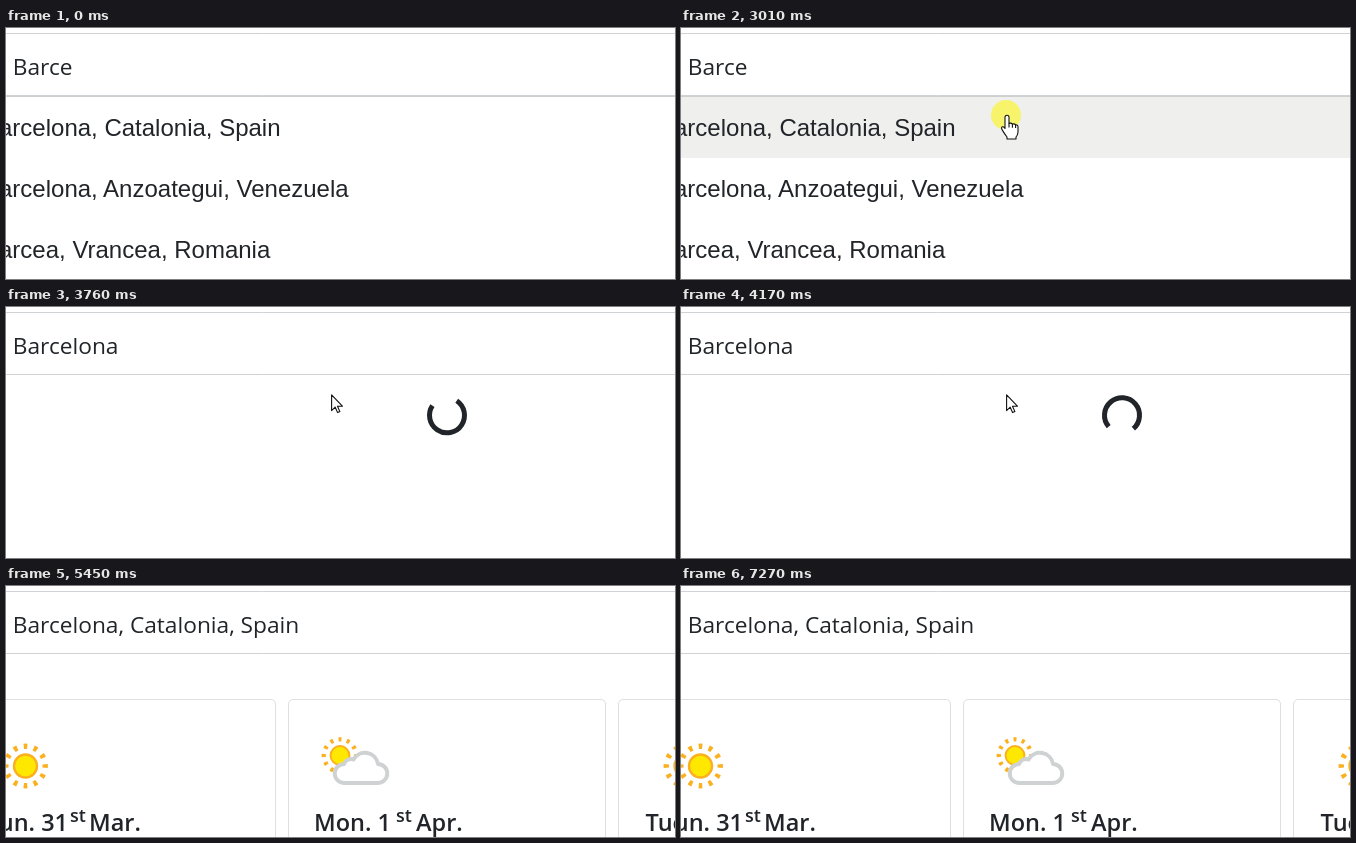
An HTML page that plays this animation: 669x251 px, repeating every 8400 ms.

```html
<!DOCTYPE html>
<html lang="en">
<head>
<meta charset="utf-8">
<title>City search</title>
<style>
  html, body { margin: 0; width: 100%; height: 100%; overflow: hidden; background: #fff; }
  svg { display: block; width: 100%; height: 100%; }
  text { fill: #212529; white-space: pre; }
  .field { font: 22.7px "Open Sans", "Noto Sans", sans-serif; }
  .option { font: 24px "Liberation Sans", Arial, sans-serif; }
  .day { font: 600 23.5px "Open Sans", "Noto Sans", sans-serif; }
  .sup { font-size: 18px; }
  .card { fill: #fff; stroke: #dfdfdf; }
  .cursor { fill: #fff; stroke: #111; stroke-width: 1.1; stroke-linejoin: round; }
</style>
</head>
<body>
<svg viewBox="0 0 669 251">
  <defs>
    <g id="sun">
      <circle r="11.5" fill="#ffe800" stroke="#fbb020" stroke-width="2.4"/>
      <circle r="19.7" fill="none" stroke="#fbb020" stroke-width="5.4" pathLength="120"
        stroke-dasharray="3.6 6.4" stroke-dashoffset="1.8"/>
    </g>
  </defs>
  <rect width="669" height="251" fill="#fff"/>
  <g id="list">
    <rect id="hover" width="669" height="61" fill="#efefee"/>
    <rect y="68" width="669" height="1" fill="#cfcfcf"/>
  </g>
  <path d="M0 5.5H669M0 67.5H669" stroke="#d0d3d6"/>
  <text id="field" class="field" x="6.8" y="47"></text>
  <circle id="spinner" r="17.5" fill="none" stroke="#212529" stroke-width="5"
    pathLength="360" stroke-dasharray="270 90"/>
  <g id="cards">
    <rect class="card" x="-47.5" y="113.5" width="317" height="160" rx="4.5"/>
    <rect class="card" x="282.5" y="113.5" width="317" height="160" rx="4.5"/>
    <rect class="card" x="612.5" y="113.5" width="317" height="160" rx="4.5"/>
    <use href="#sun" x="19.5" y="180"/>
    <use href="#sun" x="680" y="180"/>
    <use href="#sun" transform="translate(334 169.5) scale(.82)"/>
    <path d="M338.5 197a9.5 9.5 0 0 1-.5-19A7.5 7.5 0 0 1 347.5 173.5A13.2 13.2 0 0 1 372 178A9.5 9.5 0 0 1 371.5 197Z"
      fill="#fff" stroke="#cfd2d3" stroke-width="4" stroke-linejoin="round"/>
    <g class="day">
      <text x="62" y="245" text-anchor="end">Sun. 31</text>
      <text class="sup" x="64" y="236">st</text>
      <text x="83" y="245">Mar.</text>
      <text x="308" y="245">Mon. 1</text>
      <text class="sup" x="390" y="236">st</text>
      <text x="410" y="245">Apr.</text>
      <text x="639.5" y="245">Tue. 2</text>
    </g>
  </g>
  <circle id="click" cx="325" cy="87" r="15" fill="#f7f46c"/>
  <g id="hand" class="cursor">
    <path d="M-2 2.2a2 2 0 0 1 4 0V8.5q2.2-1 3.4.6q2.2-.8 3.2.8q2.2-.4 2.4 1.8V17q-.2 3-2 5V24H0V22Q-4.5 16-5.4 13.5q-.2-2.4 2-1.6L-2 13.5Z"/>
    <path d="M2 8.5v4M5.4 9.1v3.6M8.6 9.9v3" fill="none"/>
  </g>
  <path id="arrow" class="cursor" d="M.6.8V16.6L4.2 13.2L6.6 18.6L8.9 17.6L6.5 12.2H11.4Z"/>
</svg>
<script>
const LOOP = 8400;
const $ = id => document.getElementById(id);
const show = (id, on) => $(id).setAttribute('visibility', on ? 'visible' : 'hidden');
const place = (id, x, y, angle = 0) =>
  $(id).setAttribute('transform', `translate(${x} ${y}) rotate(${angle})`);
const between = (t, a, b) => t >= a && t < b;
const mix = (a, b, k) => a + (b - a) * k;

['Barcelona, Catalonia, Spain', 'Barcelona, Anzoategui, Venezuela', 'Barcea, Vrancea, Romania']
  .forEach((label, i) => {
    const row = document.createElementNS('http://www.w3.org/2000/svg', 'text');
    row.setAttribute('class', 'option');
    row.setAttribute('x', -23);
    row.setAttribute('y', 108 + 61 * i);
    row.textContent = label;
    $('list').append(row);
  });

function drawHand(t) {
  const k = Math.min(1, Math.max(0, Math.floor((t - 70) / 67.5) / 8));
  const y = mix(192, 87, 1 - (1 - k) ** 3);
  place('hand', mix(561, 326, 1 - (1 - k) ** 2), y);
  $('hover').setAttribute('y', 69 + 61 * Math.floor((y - 69) / 61));
  const over = between(t, 70, 3220);
  show('hand', over);
  show('hover', over);
  show('click', between(t, 3010, 3220));
}

function drawArrow(t) {
  const leaving = between(t, 6990, 7270);
  const k = Math.floor((t - 6990) / 70) / 3;
  if (leaving) place('arrow', mix(534, 611, k), mix(141, 230, k));
  else place('arrow', 325, 87);
  show('arrow', leaving || between(t, 3220, 5450));
}

function drawSpinner(t) {
  const tick = t < 3360 ? 3229 : 3360 + 68 * Math.floor((t - 3348) / 68);
  place('spinner', 441, 108.3, 45 + (tick - 3229) * 360 / 750);
  show('spinner', between(t, 3220, 4720));
}

function draw(t) {
  show('list', t < 3220);
  show('cards', t >= 4720);
  $('field').textContent = t < 3220 ? 'Barce' : t < 4720 ? 'Barcelona' : 'Barcelona, Catalonia, Spain';
  drawHand(t);
  drawArrow(t);
  drawSpinner(t);
}

const start = performance.now();
function tick() {
  draw((performance.now() - start) % LOOP);
  requestAnimationFrame(tick);
}
tick();
</script>
</body>
</html>
```
